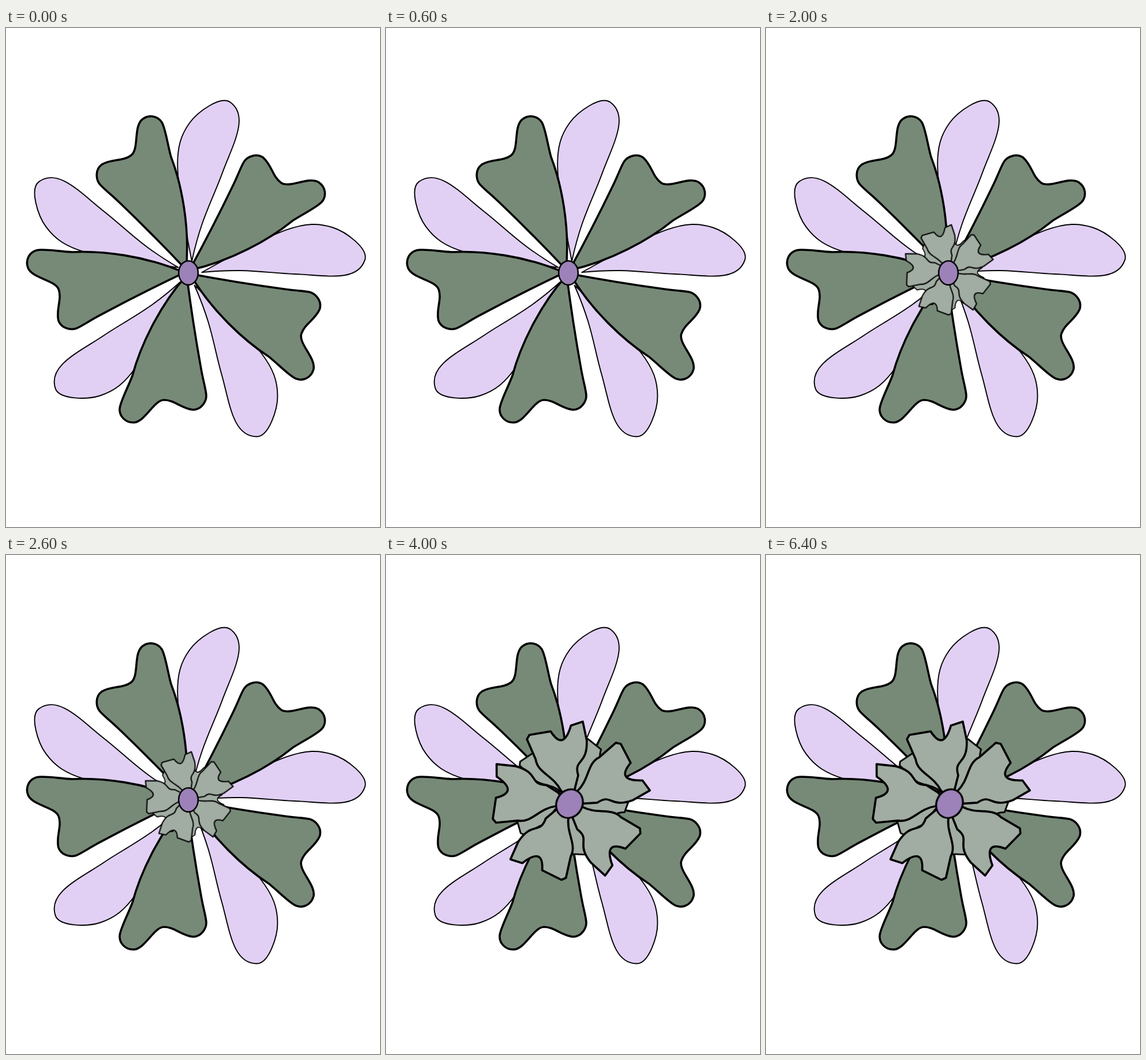
Recreate the animation shown at these times as an HTML page. Size 648 by 864 pixels, loop 8000 ms.

```html
<!DOCTYPE html>
<html lang="en">
<head>
<meta charset="utf-8">
<title>Blooming flower</title>
<style>
  html, body { margin: 0; width: 100%; height: 100%; overflow: hidden; background: #fff; }
  svg { display: block; width: 100vw; height: 100vh; stroke: #000; stroke-linejoin: round; }
  .lilac { fill: #e1d0f4; stroke-width: 1.9; }
  .green { fill: #778a78; stroke-width: 3.6; }
  .notched { fill: #a1aca2; stroke-width: 3.7; animation: 8s step-end infinite; }
  .ring1 { animation-name: show1; }
  .ring2 { animation-name: show2; }
  .ring3 { animation-name: show3; }
  .ring4 { animation-name: show4; }
  #heart { fill: #9d82b9; stroke-width: 2.5; animation: heart 8s step-end infinite; }

  @keyframes show1 { 0% { opacity: 0 } 12.5%, 100% { opacity: 1 } }
  @keyframes show2 { 0% { opacity: 0 } 25%, 100% { opacity: 1 } }
  @keyframes show3 { 0% { opacity: 0 } 37.5%, 100% { opacity: 1 } }
  @keyframes show4 { 0% { opacity: 0 } 50%, 100% { opacity: 1 } }
  @keyframes heart {
    0% { transform: translate(316px, 424px) }
    37.5% { transform: translate(319.5px, 419.5px) rotate(10deg) }
    50%, 100% { transform: translate(318px, 430.5px) rotate(30deg) scale(1.33, 1.23) }
  }
</style>
</head>
<body>
<svg id="stage" viewBox="0 0 648 864">
  <defs>
    <!-- One petal of each kind, drawn around the flower's centre. -->
    <path id="lilac" d="M9 20C40 90 42 125 56 174S75 282 117 282C138 282 153 235 153 212
      C153 160 125 128 9 20Z"/>
    <path id="green" d="M-1 5Q10 90 24 167C28 190 33 205 33 214S25 238 10 238
      C-10 236-22 221-40 221S-72 258-92 260C-108 261-118 248-117 236S-103 200-95 179
      C-82 130-50 60-1 5Z"/>
    <path id="notched" d="M0-8L-12-21C-22-48-50-55-51-79L-63-115L-58-122L-21-125
      Q-2-88 15-132L36-137L40-104C38-60 14-75 20-45L12-22Z"/>
  </defs>
  <ellipse id="heart" rx="16.8" ry="20.8"/>
</svg>
<script>
const stage = document.getElementById('stage');
const heart = document.getElementById('heart');
const PETALS = 5;

function add(parent, name, attrs) {
  const el = document.createElementNS(stage.namespaceURI, name);
  for (const key in attrs) el.setAttribute(key, attrs[key]);
  parent.append(el);
  return el;
}

// A circle of equal petals around (x, y).
function whorl(kind, x, y, scale = 1, turn = 0, extraClass = '') {
  const group = add(stage, 'g', {
    class: `${kind} ${extraClass}`,
    transform: `translate(${x} ${y}) scale(${scale})`
  });
  for (let k = 0; k < PETALS; k++) {
    add(group, 'use', { href: '#' + kind, transform: `rotate(${turn + k * 360 / PETALS})` });
  }
}

whorl('lilac', 317.5, 425.5);
whorl('green', 314, 423);
whorl('notched', 316, 424, .465, 19, 'ring1');
whorl('notched', 316, 420.5, .565, 61, 'ring2');
whorl('notched', 318, 419, .78, 43, 'ring3');
whorl('notched', 317, 428, 1, 67, 'ring4');
stage.append(heart);
</script>
</body>
</html>
```
